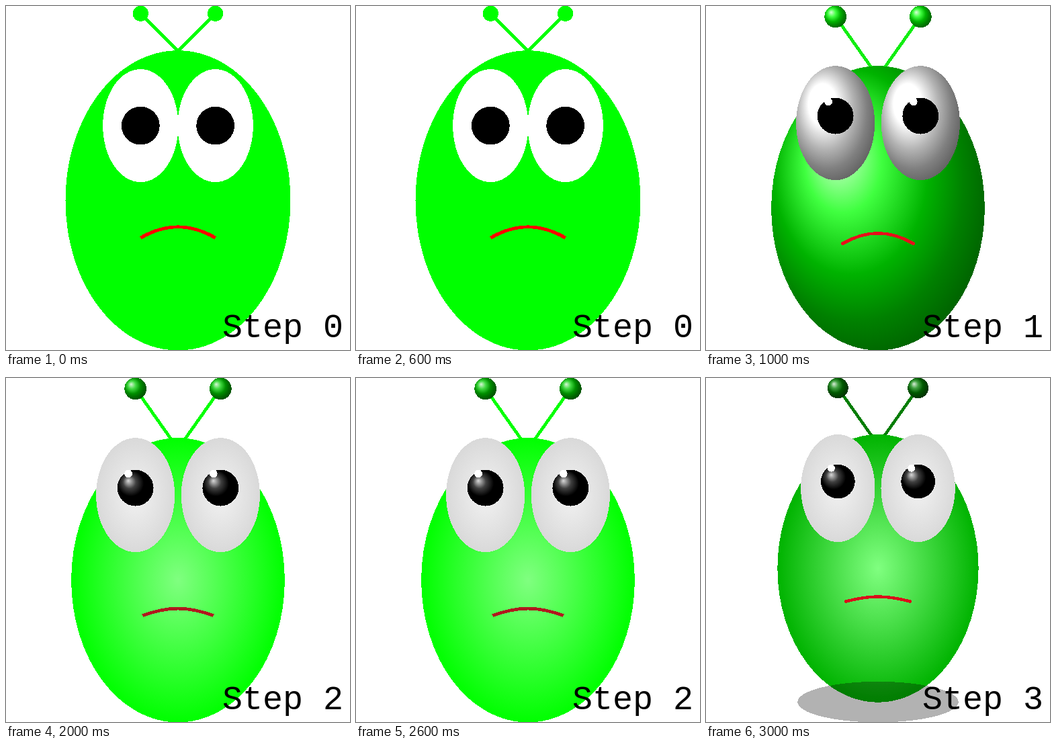
Write an HTML page that moves like this. It is 512 by 512 pixels and loops after 4 s.

```html
<!DOCTYPE html>
<html lang="en">
<head>
<meta charset="utf-8">
<title>Alien, step by step</title>
<style>
  html, body { margin: 0; width: 100%; height: 100%; overflow: hidden; background: #fff; }
  svg { display: block; width: 100vw; height: 100vh; }
  text { font: 50px "Liberation Mono", "Courier New", monospace; white-space: pre; }
</style>
</head>
<body>
<svg viewBox="0 0 512 512">
  <defs id="defs"></defs>
  <g id="steps" shape-rendering="crispEdges"></g>
  <text id="label" x="322" y="493"></text>
</svg>
<script>
const $ = id => document.getElementById(id);
const STEP_MS = 1000;
const GROW = .01; // shapes cover every pixel they touch, about half a pixel more

const mix = (c, p, base) => `rgb(${c.map(v => Math.round(v * p + base * (1 - p)))})`;

function gradient(id, attrs, stops) {
  const list = stops.map(([at, color]) => `<stop offset="${at}" stop-color="${color}"/>`);
  $('defs').innerHTML += `<radialGradient id="${id}" ${attrs}>${list.join('')}</radialGradient>`;
  return `url(#${id})`;
}

// Shiny sphere lit from the upper left
const ball = (id, c) => gradient(id, 'r="1" fx=".3" fy=".3"', [
  [0, mix(c, .15, 255)], [.18, mix(c, .75, 255)],
  [.36, mix(c, .7, 0)], [.5, mix(c, .5, 0)], [1, '#000']
]);
const glow = (id, inner, outer) => gradient(id, '', [[0, inner], [1, outer]]);

const ellipse = (x, y, rx, ry, fill) =>
  `<ellipse cx="${x}" cy="${y}" rx="${rx + GROW}" ry="${ry + GROW}" fill="${fill}"/>`;
const stroke = (d, color, cap = 'butt') =>
  `<path d="${d}" fill="none" stroke="${color}" stroke-width="${.07 + 2 * GROW}" stroke-linecap="${cap}"/>`;
const pair = draw => draw(-1) + draw(1);

// Arc between (-1,1) and (1,1) leaving at the given angle
function mouth(bend, color, cap) {
  const a = bend * Math.PI / 180, k = .783;
  const x = 1 - k * Math.cos(a), y = 1 - k * Math.sin(a);
  return stroke(`M-1 1C${-x} ${y} ${x} ${y} 1 1`, color, cap);
}

// Lengths are in units of a quarter of the body's half height
function alien(s) {
  const e = s.eye, a = s.antenna;
  return pair(m => stroke(`M0 ${-a.root}L${m * e.x} ${-a.top}`, a.color)
                 + ellipse(m * e.x, -a.top, a.r, a.r, a.ball))
    + ellipse(0, 0, 3, 4, s.body)
    + pair(m => ellipse(m * e.x, -e.y, e.rx, e.ry, s.white)
              + ellipse(m * e.x, -e.pupil, .5, .5, s.pupil)
              + (e.glint ? ellipse(m * e.x - .2, -3, e.glint, e.glint, '#fff') : ''))
    + mouth(s.bend, s.lips, s.cap)
    + (s.shadow ? ellipse(0, 4, 2.4, .6, 'rgba(0,0,0,.3)') : '');
}

const green = [0, 255, 0], black = [0, 0, 0];
const flatEye = { x: 1, y: 2, rx: 1, ry: 1.5, pupil: 2 };
const bigEye = { x: 1.2, y: 2.4, rx: 1.1, ry: 1.6, pupil: 2.6, glint: .1 };
const antenna = (color, ball) => ({ root: 3.7, top: 5.4, r: .3, color, ball });
const greenBall = ball('green', green), blackBall = ball('black', black);
const paleGlow = glow('pale', '#f2f2f2', '#d9d9d9');

const looks = [
  { height: 9.2, body: '#0f0', white: '#fff', pupil: '#000', eye: flatEye,
    antenna: { root: 4, top: 5, r: .2, color: '#0f0', ball: '#0f0' },
    bend: 30, lips: '#f00' },
  { height: 9.7, body: greenBall, white: ball('white', [255, 255, 255]), pupil: '#000',
    eye: bigEye, antenna: antenna('#1e1', greenBall),
    bend: 30, lips: '#e6101a', cap: 'round' },
  { height: 9.7, body: glow('lime', '#80ff80', '#0f0'), white: paleGlow,
    pupil: blackBall, eye: bigEye, antenna: antenna('#0f0', ball('mid', [0, 204, 0])),
    bend: 20, lips: '#b01a1e' },
  { height: 10.3, body: glow('leaf', '#80ff80', '#00b300'), white: paleGlow,
    pupil: blackBall, eye: bigEye, antenna: antenna('#007d00', ball('deep', [0, 128, 0])),
    bend: 15, lips: '#d9101a', shadow: true }
];

$('steps').innerHTML = looks.map(s => {
  const unit = 512 / s.height;
  const y = (s.antenna.top + s.antenna.r) * unit;
  return `<g transform="translate(256 ${y}) scale(${unit})">${alien(s)}</g>`;
}).join('');

const groups = [...$('steps').children];
const start = performance.now();

function show(now) {
  const step = Math.floor(Math.max(0, now - start) / STEP_MS) % looks.length;
  groups.forEach((g, i) => g.style.display = i === step ? '' : 'none');
  $('label').textContent = `Step ${step}`;
  requestAnimationFrame(show);
}
show(start);
</script>
</body>
</html>
```
